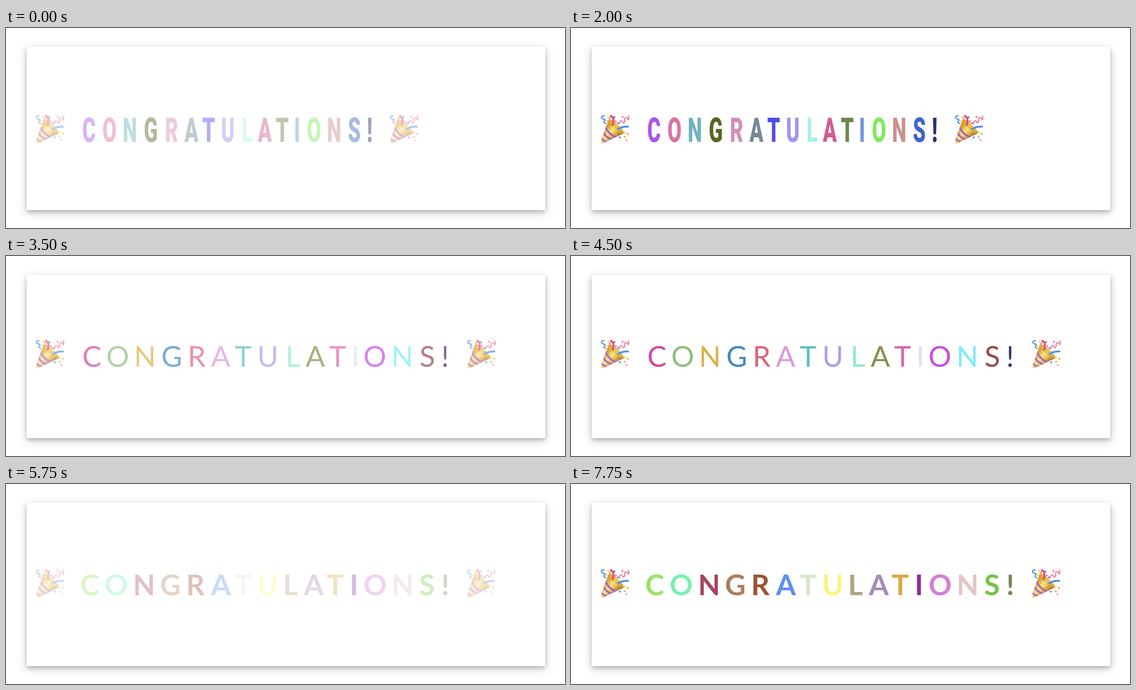
Write an HTML page that moves like this. It is 1249 by 448 pixels and loops after 8 s.

```html
<!DOCTYPE html>
<html lang="en">
<head>
<meta charset="utf-8">
<title>Congratulations</title>
<style>
  html, body { margin: 0; width: 100%; height: 100%; overflow: hidden; background: #fff; }
  #card {
    position: absolute; left: 46px; top: 42px; width: 1159px; height: 366px; background: #fff;
    box-shadow: 0 4px 8px rgba(0, 0, 0, .2), 0 6px 20px rgba(0, 0, 0, .19);
  }
  svg { position: absolute; left: 0; top: 0; }
</style>
</head>
<body>
<div id="card"></div>
<svg id="stage" width="1249" height="448" viewBox="0 0 1249 448">
  <defs>
    <linearGradient id="gold" gradientUnits="userSpaceOnUse" x1="10" y1="32" x2="32" y2="54">
      <stop offset="0" stop-color="#d9a02c"/>
      <stop offset=".4" stop-color="#fbe57c"/>
      <stop offset=".7" stop-color="#e5b83c"/>
      <stop offset="1" stop-color="#b47a2c"/>
    </linearGradient>
    <linearGradient id="mouth" gradientUnits="userSpaceOnUse" x1="18" y1="10" x2="52" y2="41">
      <stop offset="0" stop-color="#c8922e"/>
      <stop offset=".5" stop-color="#e9c751"/>
      <stop offset="1" stop-color="#c08a30"/>
    </linearGradient>
    <clipPath id="coneClip"><path d="M18 10 L52 41 L6 63 Q0 65 1 58 Z"/></clipPath>
    <g id="popper">
      <path d="M18 10 L52 41 L6 63 Q0 65 1 58 Z" fill="url(#gold)"/>
      <g clip-path="url(#coneClip)" fill="none" stroke="#a35fd8" stroke-width="4">
        <path d="M10 24 Q18 46 40 51"/>
        <path d="M6 38 Q12 52 29 56"/>
        <path d="M1 51 Q6 59 18 61"/>
      </g>
      <ellipse cx="35" cy="25.500" rx="23" ry="5.500" transform="rotate(42.400 35 25.500)" fill="url(#mouth)"/>
      <g fill="none" stroke-linecap="round">
        <path d="M8 2 C2 1 0 6 4 8 S12 9 9 13 S7 17 12 19" stroke="#4a84ea" stroke-width="2.500"/>
        <path d="M23 2 C30 5 30 12 27 22" stroke="#ee4668" stroke-width="4.500"/>
        <path d="M43 20 C41 13 48 10 49 15 S55 17 54 11 S59 4 61 9 S64 5 62 2" stroke="#f4698f" stroke-width="2.200"/>
        <path d="M38 32 Q48 25 63 26" stroke="#4a8cf0" stroke-width="4" stroke-linecap="butt"/>
      </g>
      <g id="confetti"></g>
    </g>
  </defs>
  <path id="cursor" d="M0 0 V12.500 L3 9.800 L5.200 14.500 L7.600 13.400 L5.400 8.900 H9.500 Z"
        fill="#000" stroke="#fff" stroke-width="1" paint-order="stroke"/>
</svg>
<script>
const LOOP = 8000, STEP = 250, FADE = 3000;
const WORD = 'CONGRATULATIONS!';
const stage = document.getElementById('stage');
const cursor = document.getElementById('cursor');
const pen = document.createElement('canvas').getContext('2d');

// Each line: start time, face, ink centres of the letters, and popper places.
const lines = [
  { start: -900, family: 'Roboto, sans-serif', weight: 900, size: 76, narrow: .6, base: 255, top: 195, right: 857,
    centres: [185.5, 231, 277, 323.5, 370.5, 414, 453, 495.5, 539.5, 578, 617.5, 650, 688, 733.5, 778, 812.5],
    colors: 'ad55eb da74a3 6fb3c2 576725 d28eba 758a97 4f4ced a394ee aaf1ec d25c8d 6d874b 7399d8 7deb5c c9918e 3c67c7 2b3373' },
  { start: 2100, family: 'Lato, sans-serif', weight: 400, size: 64, narrow: 1, base: 248, top: 188, right: 1030,
    centres: [193, 250, 310.5, 370.5, 428.5, 480, 529.5, 585, 643, 691.5, 740.5, 780.5, 824.5, 885.5, 941, 981],
    colors: 'ce419b 89bd75 daac43 3c83bc dc5d72 db93d6 59bcbd ae96e7 87ebc8 7f8a40 de5ba7 d7e2ef c546de 70edf8 934147 392557' },
  { start: 5100, family: 'Lato, sans-serif', weight: 700, size: 64, narrow: 1, base: 249, top: 191, right: 1029,
    centres: [188, 246.5, 309, 367, 426, 480, 529.5, 584.5, 638, 687.5, 735.5, 777.5, 825, 886.5, 940, 981.5],
    colors: '98e262 7aeeb0 a5415b aa7d5a 98502f 5c8cf3 d8e6cc f8f67c b0a27c a589b8 d9a742 8a2a96 d67cd6 e4c4c4 72c445 7c8458' }
];

function add(parent, tag, attrs) {
  const node = document.createElementNS('http://www.w3.org/2000/svg', tag);
  for (const key in attrs) node.setAttribute(key, attrs[key]);
  return parent.appendChild(node);
}

const confetti = [
  [21, 7, '#f27a9a'], [31, 5, '#4a84ea'], [34, 14, '#f4708e'], [39, 18, '#5b93ee'], [14, 13, '#f5d858'],
  [49, 4, '#f27a9a'], [43, 50, '#5b8ff0'], [54, 39, '#f6d558'], [61, 42, '#e6a94c'], [54, 49, '#efb04e'],
  [58, 56, '#f5a0b8'], [17, 4, '#f5d858']
];
for (const [x, y, fill] of confetti) {
  add(document.getElementById('confetti'), 'rect',
    { x: x - 2, y: y - 2, width: 4, height: 4, rx: .5, fill, transform: `rotate(${x * 7 % 50 + 15} ${x} ${y})` });
}

function buildLine(line) {
  const group = add(stage, 'g', {});
  for (const x of [66, line.right]) add(group, 'use', { href: '#popper', x, y: line.top });
  const colors = line.colors.split(' ');
  pen.font = `${line.weight} ${line.size}px ${line.family}`;
  [...WORD].forEach((letter, i) => {
    const ink = pen.measureText(letter);
    const middle = (ink.actualBoundingBoxRight - ink.actualBoundingBoxLeft) / 2;
    add(group, 'text', {
      'font-family': line.family, 'font-weight': line.weight, 'font-size': line.size, fill: '#' + colors[i],
      transform: `translate(${line.centres[i]} ${line.base}) scale(${line.narrow} 1)`, x: -middle
    }).textContent = letter;
  });
  return group;
}

const groups = lines.map(buildLine);
stage.append(cursor);
const pointer = { 2250: [188, 2], 2500: [181, 31] };

function draw(elapsed) {
  const t = Math.floor(elapsed % LOOP / STEP) * STEP;
  lines.forEach(({ start }, i) => {
    const p = (t - start) / FADE;
    groups[i].setAttribute('opacity', p >= 0 && p < 1 ? Math.sin(p * Math.PI / 2) : 0);
  });
  const spot = pointer[t];
  cursor.setAttribute('visibility', spot ? 'visible' : 'hidden');
  if (spot) cursor.setAttribute('transform', `translate(${spot})`);
}

const begin = performance.now();
function tick() {
  draw(Math.max(0, performance.now() - begin));
  requestAnimationFrame(tick);
}
tick();
</script>
</body>
</html>
```
